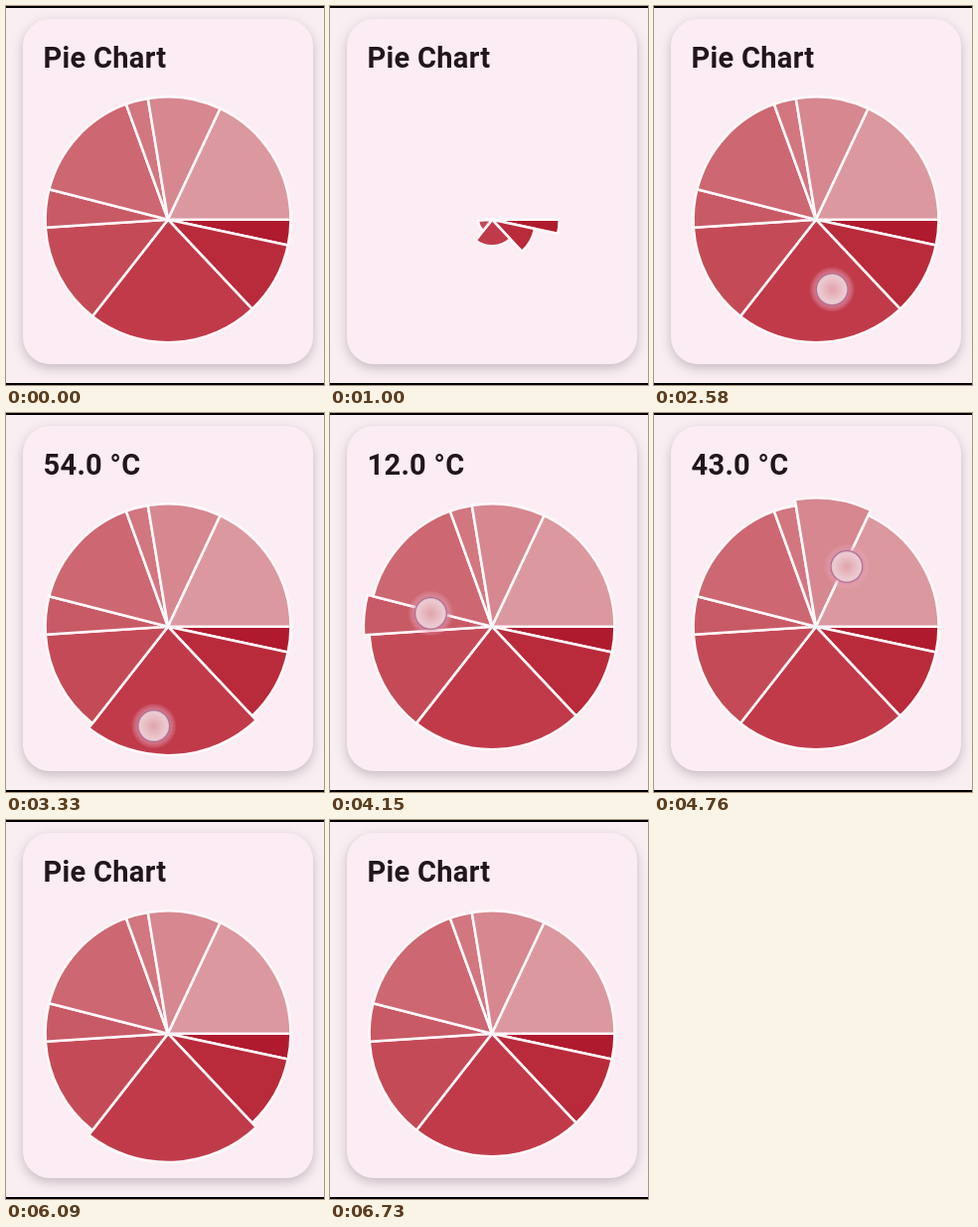
These frames come from a looping animation (320x381 px, 7.12 s). An HTML page with a canvas:

```html
<!DOCTYPE html>
<html lang="en">
<head>
<meta charset="utf-8">
<title>Pie Chart</title>
<style>
  html, body { margin: 0; width: 100%; height: 100%; overflow: hidden; }
  body { position: relative; background: #f9eff3; }
  .card {
    position: absolute; left: 17px; top: 13px; width: 292px; height: 347px;
    border-radius: 27px; background: #fbedf3;
    box-shadow: 0 4px 12px rgba(70, 50, 60, .28);
  }
  .bars { position: absolute; inset: 0; border: solid #000; border-width: 2px 0; }
  #title {
    position: absolute; left: 37.5px; top: 35px; margin: 0; white-space: pre;
    font: 700 29px/34px Roboto, sans-serif; letter-spacing: .3px; color: #21161b;
  }
  canvas { position: absolute; left: 0; top: 0; width: 320px; height: 381px; }
</style>
</head>
<body>
<div class="card"></div>
<div class="bars"></div>
<h1 id="title">Pie Chart</h1>
<canvas id="chart"></canvas>
<script>
const LOOP = 7120, REPLAY = 700;
const TOUCH = 2580, SELECT = 2700, LIFT = 5480, DESELECT = 6090;
const CX = 163, CY = 214.7, RADIUS = 123.5, POP = 6, POP_MS = 200;

const values = [8, 23, 54, 32, 12, 37, 7, 23, 43];
const colors = ['#b01a2e', '#b92a3b', '#c03a4a', '#c44a57', '#c85a66',
                '#cd6772', '#d27680', '#d68790', '#db989f'];
const total = values.reduce((a, b) => a + b);
let sum = 0;
const slices = values.map((value, i) => ({
  value, color: colors[i], from: sum / total * 360, to: (sum += value) / total * 360
}));

// Finger path around the centre: time, angle in degrees, distance
const path = [[2580, 77, 72], [2760, 77, 72], [3330, 98, 101], [4150, 192, 63],
              [4740, 293, 68], [5390, 422, 61], [5480, 428, 63]];

const clamp = x => Math.min(1, Math.max(0, x));
const ease = x => 1 - (1 - clamp(x)) ** 3;
const rad = deg => deg * Math.PI / 180;

function finger(t) {
  const k = Math.max(1, path.findIndex(p => p[0] >= t));
  const [a, b] = t >= LIFT ? [path.at(-1), path.at(-1)] : [path[k - 1], path[k]];
  const f = a === b ? 0 : clamp((t - a[0]) / (b[0] - a[0]));
  return { angle: a[1] + (b[1] - a[1]) * f, dist: a[2] + (b[2] - a[2]) * f };
}

// Time spans during which each slice is selected
const spans = [];
for (let t = SELECT; t < DESELECT; t += 10) {
  const angle = finger(t).angle % 360;
  const index = slices.findIndex(s => angle < s.to);
  const last = spans.at(-1);
  if (last && last.index === index) last.end = t + 10;
  else spans.push({ index, start: t, end: t + 10 });
}

const canvas = document.getElementById('chart');
const title = document.getElementById('title');
const ctx = canvas.getContext('2d');
const scale = window.devicePixelRatio || 1;
canvas.width = 320 * scale;
canvas.height = 381 * scale;
ctx.scale(scale, scale);

const grow = (i, t) =>
  t < REPLAY ? 1 : clamp((t - REPLAY - 55 * i) / (438 + 30 * i)) ** 1.6;

const pop = (i, t) => Math.max(0, ...spans.filter(s => s.index === i).map(s =>
  ease((t - s.start) / POP_MS) * (1 - ease((t - s.end) / POP_MS))));

function drawSlice(slice, i, t) {
  const r = RADIUS * grow(i, t) + POP * pop(i, t);
  if (r < .5) return;
  ctx.beginPath();
  ctx.moveTo(CX, CY);
  ctx.arc(CX, CY, r, rad(slice.from), rad(slice.to));
  ctx.closePath();
  ctx.fillStyle = slice.color;
  ctx.fill();
  ctx.stroke();
}

function drawFinger(t) {
  if (t < TOUCH || t > LIFT + 280) return;
  const { angle, dist } = finger(t);
  const x = CX + dist * Math.cos(rad(angle)), y = CY + dist * Math.sin(rad(angle));
  const glow = ctx.createRadialGradient(x, y, 0, x, y, 23);
  glow.addColorStop(0, '#e0a3ab');
  glow.addColorStop(.58, '#eccbd1');
  glow.addColorStop(.64, '#e6c3d0');
  glow.addColorStop(.69, '#a5688c');
  glow.addColorStop(.74, 'rgba(225, 150, 175, .6)');
  glow.addColorStop(1, 'rgba(235, 190, 205, 0)');
  ctx.globalAlpha = 1 - clamp((t - LIFT) / 280);
  ctx.fillStyle = glow;
  ctx.beginPath();
  ctx.arc(x, y, 23, 0, 7);
  ctx.fill();
  ctx.globalAlpha = 1;
}

function frame(now) {
  const t = now % LOOP;
  const selected = spans.find(s => t >= s.start && t < s.end);
  title.textContent = selected ? values[selected.index].toFixed(1) + ' °C' : 'Pie Chart';
  ctx.clearRect(0, 0, 320, 381);
  ctx.strokeStyle = '#fff8fb';
  ctx.lineWidth = 2.6;
  ctx.lineJoin = 'bevel';
  slices.forEach((slice, i) => drawSlice(slice, i, t));
  drawFinger(t);
  requestAnimationFrame(frame);
}
requestAnimationFrame(frame);
</script>
</body>
</html>
```
